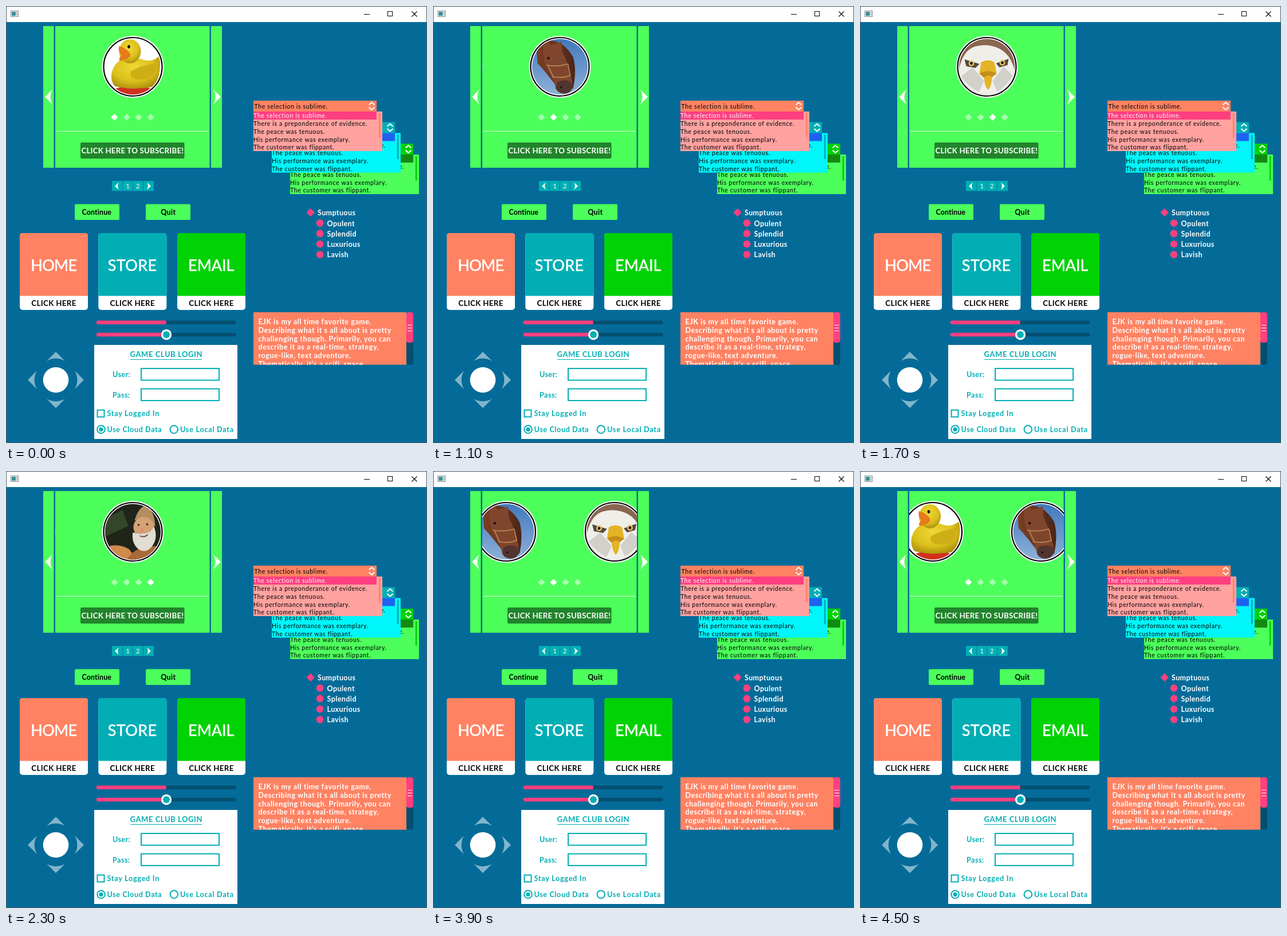
An HTML page for the animation above (4.6 s loop, 735 by 762 pixels).

```html
<!DOCTYPE html>
<html lang="en">
<head>
<meta charset="utf-8">
<title>Interface widgets</title>
<style>
html, body { margin: 0; width: 100%; height: 100%; overflow: hidden; background: #046b99; }
svg { display: block; font-family: Lato, "Open Sans", sans-serif; }
text { white-space: pre; }
</style>
</head>
<body>
<svg id="stage" width="735" height="762" viewBox="0 0 735 762">
  <defs>
    <clipPath id="panel"><rect x="86" y="35" width="270" height="247"/></clipPath>
    <clipPath id="lens"><circle r="48.5"/></clipPath>
    <clipPath id="story"><rect x="432" y="534" width="267" height="91.5"/></clipPath>
    <linearGradient id="sky" x1="0" y1="0" x2="0" y2="1">
      <stop offset="0" stop-color="#3f78bd"/><stop offset="1" stop-color="#8fb2d8"/>
    </linearGradient>
    <linearGradient id="coat">
      <stop offset="0" stop-color="#7c3f24"/><stop offset="1" stop-color="#4c2618"/>
    </linearGradient>
    <radialGradient id="yellow" cx=".45" cy=".35" r=".7">
      <stop offset="0" stop-color="#f0d834"/><stop offset=".6" stop-color="#dcc01c"/><stop offset="1" stop-color="#a88a0c"/>
    </radialGradient>

    <g id="pic0">
      <rect x="-50" y="-50" width="100" height="100" fill="#fff"/>
      <ellipse cx="1" cy="42" rx="35" ry="8" fill="#d2301f"/>
      <path d="M-20 -13C-41 0 -41 25 -31 34Q0 42 35 35C46 26 49 4 47 -20C38 -9 24 -9 13 -14Z" fill="url(#yellow)"/>
      <path d="M-4 9C10 -2 31 -3 42 -8C42 14 29 24 8 22Q-5 20 -4 9Z" fill="#cfae15"/>
      <ellipse cx="-5" cy="-27" rx="19" ry="21" fill="url(#yellow)"/>
      <path d="M-24 -36Q-13 -33 -6 -25Q-2 -19 -9 -15L-22 -10Q-27 -14 -19 -20Q-27 -27 -24 -36Z" fill="#e8791c"/>
      <ellipse cx="-7" cy="-35" rx="2.4" ry="3" fill="#20180c"/>
    </g>
    <g id="pic1">
      <rect x="-50" y="-50" width="100" height="100" fill="url(#sky)"/>
      <path d="M-41 -34Q-35 -48 -17 -46Q8 -44 23 -17Q30 6 23 38L3 46Q-25 8 -39 -6Z" fill="url(#coat)"/>
      <path d="M-29 -42L-25 -52L-16 -38L3 -44L4 -27Q15 -4 21 23Q25 41 13 46Q-2 49 -7 38Q-10 23 -20 8Q-32 -14 -29 -42Z" fill="#80462d"/>
      <path d="M-5 27Q9 20 20 27Q26 40 13 46Q-1 49 -7 38Z" fill="#523530"/>
      <path d="M-24 -3Q-7 1 14 -5M-14 17Q2 21 19 15M-21 -3L-12 17M14 -5L18 15" fill="none" stroke="#b98e55" stroke-width="1.5"/>
      <circle cx="-20" cy="-15" r="2.3" fill="#1d1210"/>
      <circle cx="2" cy="36" r="2" fill="#241614"/>
    </g>
    <g id="pic2">
      <rect x="-50" y="-50" width="100" height="100" fill="#8a6650"/>
      <path d="M-50 11Q-43 -31 -18 -36Q4 -41 23 -31Q43 -20 50 11V50H-50Z" fill="#efeee9"/>
      <path d="M-45 17Q-34 34 -14 44L-5 25L-25 1ZM45 15Q35 34 18 43L10 25L29 0Z" fill="#d2d0ca"/>
      <path d="M-39 -13L-13 -5L-20 2L-36 -1ZM38 -14L16 -6L22 1L36 -3Z" fill="#56483d"/>
      <circle cx="-27" cy="-6" r="5" fill="#e2c260"/><circle cx="27" cy="-7" r="5" fill="#e2c260"/>
      <circle cx="-27" cy="-6" r="2.4" fill="#161310"/><circle cx="27" cy="-7" r="2.4" fill="#161310"/>
      <path d="M-10 -8Q2 -15 13 -8L17 12L9 18Q8 36 2 40Q-4 34 -5 19L-13 12Z" fill="#e4b327"/>
      <path d="M-13 12Q1 3 17 12L9 18Q2 12 -5 19Z" fill="#c58e1b"/>
    </g>
    <g id="pic3">
      <rect x="-50" y="-50" width="100" height="100" fill="#20251a"/>
      <path d="M-50 -22L-18 -38L-8 -10L-50 9Z" fill="#344629"/>
      <path d="M-50 28Q-28 18 -7 30L9 50H-50Z" fill="#d08b4c"/>
      <path d="M-11 50Q2 24 42 25L50 50Z" fill="#a96938"/>
      <path d="M3 -20Q10 -44 24 -46Q39 -33 39 -9L28 -18Z" fill="#b48d61"/>
      <ellipse cx="19" cy="-8" rx="18" ry="18" fill="#d5a177"/>
      <path d="M0 1Q11 5 18 3Q30 4 37 -9Q45 12 32 27Q21 39 8 29Q-3 18 0 1Z" fill="#dfddd4"/>
      <circle cx="16" cy="-3" r="4.2" fill="#dd9670"/>
      <circle cx="10" cy="-12" r="1.8" fill="#33251c"/><circle cx="25" cy="-13" r="1.8" fill="#33251c"/>
      <path d="M12 7Q19 11 26 5" fill="none" stroke="#874b36" stroke-width="2"/>
    </g>
  </defs>
</svg>
<script>
const PINK = "#ff3f7f", CORAL = "#ff8262", TEAL = "#00aeb4", LIME = "#4cff5b",
      GREEN = "#00d204", DEEP = "#044f70", WHITE = "#fff", BLACK = "#000";
const out = [];
const add = s => out.push(s);
const rect = (x, y, w, h, fill, rx = 0, more = "") =>
  add(`<rect x="${x}" y="${y}" width="${w}" height="${h}" rx="${rx}" fill="${fill}" ${more}/>`);
const box = (x, y, w, h, stroke, width) =>
  rect(x, y, w, h, "none", 0, `stroke="${stroke}" stroke-width="${width}"`);
const circle = (x, y, r, fill, more = "") =>
  add(`<circle cx="${x}" cy="${y}" r="${r}" fill="${fill}" ${more}/>`);
const path = (d, fill, more = "") => add(`<path d="${d}" fill="${fill}" ${more}/>`);
const line = (d, stroke, width) => path(d, "none", `stroke="${stroke}" stroke-width="${width}"`);
const text = (s, x, y, size, fill, weight = 700, gap = 0, more = "") =>
  add(`<text x="${x}" y="${y}" font-size="${size}" fill="${fill}" font-weight="${weight}" letter-spacing="${gap}" ${more}>${s}</text>`);
const MID = 'text-anchor="middle"';
const diamond = (x, y, r) => `M${x - r} ${y}L${x} ${y - r}L${x + r} ${y}L${x} ${y + r}Z`;

function star(x, y, r) {
  let d = "";
  for (let i = 0; i < 16; i++) {
    const a = i * Math.PI / 8, q = i % 2 ? r * 0.78 : r;
    d += `${i ? "L" : "M"}${(x + q * Math.cos(a)).toFixed(2)} ${(y + q * Math.sin(a)).toFixed(2)}`;
  }
  return d + "Z";
}

// Arrowhead with a hollow back, pointing left before rotation.
const arrow = (x, y, len, half, turn, more = "") =>
  path(`M0 0L${len} ${-half}Q${len * 0.45} 0 ${len} ${half}Z`, WHITE,
    `transform="translate(${x} ${y}) rotate(${turn})" ${more}`);

function titleBar() {
  rect(0, 0, 735, 28, WHITE);
  rect(8.5, 8.5, 13, 10, "#f4f6f7", 0, 'stroke="#7f898e"');
  rect(10, 10, 7, 7, "#3b8f98");
  rect(18, 10, 2, 7, "#a9bcc2");
  line("M625 14.5H635", BLACK, 1);
  box(666.5, 9.5, 8, 8, BLACK, 1);
  line("M708.5 9.5L717.5 18.5M717.5 9.5L708.5 18.5", BLACK, 1.1);
}

function carousel() {
  rect(65, 35, 18.5, 247, LIME);
  rect(86, 35, 269.5, 247, LIME);
  rect(358, 35, 19, 247, LIME);
  arrow(68, 158.5, 13, 13, 0);
  arrow(375, 158.5, 13, 13, 180);
  add('<g clip-path="url(#panel)"><g id="strip">');
  for (let i = 0; i < 4; i++) {
    add(`<g transform="translate(${221.5 + i * STEP} 106)">`);
    circle(0, 0, 54, WHITE);
    circle(0, 0, 51, WHITE, 'stroke="#000" stroke-width="2.2"');
    add(`<g clip-path="url(#lens)"><use href="#pic${i}"/></g></g>`);
  }
  add("</g></g>");
  for (let i = 0; i < 4; i++) path(diamond(189.3 + i * 21.1, 194, 6), WHITE, 'class="dot"');
  line("M88 218.5H354", "#d2ffd5", 1);
  rect(130, 238, 181.5, 28, "#21842b", 2);
  text("CLICK HERE TO SUBSCRIBE!", 220.8, 257, 13.3, WHITE, 700, 0.2, MID);
}

function pager() {
  rect(185, 305, 73, 17.5, TEAL);
  line("M203.5 305V322.5M221.5 305V322.5M239.5 305V322.5", "#04809f", 1);
  arrow(190, 314, 7, 6.5, 0);
  arrow(253, 314, 7, 6.5, 180);
  text("1", 212.6, 318, 11, WHITE, 400, 0, MID);
  text("2", 230.2, 318, 11, WHITE, 400, 0, MID);
}

function tile(x, label, fill, gap) {
  rect(x, 396, 119, 134, WHITE, 5);
  path(`M${x} 505.5V401q0 -5 5 -5h109q5 0 5 5V505.5Z`, fill);
  text(label, x + 59.3, 461.5, 27, WHITE, 400, gap, MID + ' stroke="#fff" stroke-width=".5"');
  text("CLICK HERE", x + 59.5, 522.5, 13.3, BLACK, 700, 0.35, MID);
}

function buttons() {
  rect(120, 345.5, 78, 27.5, LIME, 2);
  rect(244, 345.5, 78, 27.5, LIME, 2);
  text("Continue", 158.3, 364, 12.5, BLACK, 700, 0.1, MID);
  text("Quit", 283.3, 364, 12.5, BLACK, 700, 0.3, MID);
  tile(24, "HOME", CORAL, -0.7);
  tile(161.3, "STORE", TEAL, 0.4);
  tile(299, "EMAIL", GREEN, 0);
}

function sliders() {
  for (const y of [548.5, 569.7]) {
    rect(158, y, 243.5, 6.5, DEEP, 3);
    path(`M279.5 ${y}H161a3.2 3.25 0 0 0 0 6.5H279.5Z`, PINK);
  }
  circle(280, 573, 9.2, WHITE);
  path(star(280, 573, 6.8), TEAL);
}

function stick() {
  circle(87, 652, 22.3, WHITE);
  [[38, 652], [87, 603], [136, 652], [87, 701]].forEach(([x, y], i) =>
    arrow(x, y, 16, 16, i * 90, 'opacity=".5"'));
}

function login() {
  rect(154, 591, 250, 164, WHITE);
  text("GAME CLUB LOGIN", 279.8, 612, 13, TEAL, 700, 0.57, MID);
  line("M217 616.5H342", TEAL, 1);
  text("User:", 186, 647, 12.6, TEAL, 700, 0.35);
  text("Pass:", 186, 682.5, 12.6, TEAL, 700, 0.45);
  box(236, 632, 136, 20.5, TEAL, 2);
  box(236, 667.5, 136, 20.5, TEAL, 2);
  box(159.5, 704.5, 12, 12, TEAL, 2);
  text("Stay Logged In", 176.5, 715, 12.6, TEAL, 700, 0.74);
  for (const x of [166, 293.3]) circle(x, 738.3, 6.8, WHITE, `stroke="${TEAL}" stroke-width="2"`);
  circle(166, 738.3, 3.6, TEAL);
  text("Use Cloud Data", 176.5, 743, 12.6, TEAL, 700, 0.62);
  text("Use Local Data", 304, 743, 12.6, TEAL, 700, 0.76);
}

const ROWS = ["The selection is sublime.", "There is a preponderance of evidence.",
  "The peace was tenuous.", "His performance was exemplary.", "The customer was flippant."];

function dropdown(x, y, head, pick, list) {
  const row = (s, dx, dy, fill = BLACK) => text(s, x + dx, y + dy, 10.5, fill, 400, 0.66);
  rect(x, y, 215, 19, head);
  row(ROWS[0], 1.5, 14);
  line(`M${x + 201.5} ${y + 7.5}l5 -4.5l5 4.5m-10 4l5 4.5l5 -4.5`, WHITE, 2);
  rect(x, y + 19, 225, 69, list);
  rect(x, y + 19, 215, 14, pick);
  ROWS.forEach((s, i) => row(s, 0, 30.3 + i * 13.75, i ? BLACK : WHITE));
  rect(x + 218.8, y + 22, 2.8, 42.5, head);
}

function bullets() {
  path(diamond(531.7, 360, 7.2), PINK);
  text("Sumptuous", 544, 365, 12.5, WHITE, 700, 0.4);
  ["Opulent", "Splendid", "Luxurious", "Lavish"].forEach((s, i) => {
    path(star(548, 378.5 + i * 18.3, 7.2), PINK);
    text(s, 560.5, 383.5 + i * 18.3, 12.5, WHITE, 700, 0.42);
  });
}

function story() {
  rect(432, 534, 267, 91.5, CORAL);
  add('<g clip-path="url(#story)">');
  ["EJK is my all time favorite game.", "Describing what it s all about is pretty",
    "challenging though. Primarily, you can", "describe it as a real-time, strategy,",
    "rogue-like, text adventure.", "Thematically, it's a scifi, space"
  ].forEach((s, i) => text(s, 440.5, 555.3 + i * 14.7, 12.5, WHITE, 700, 0.58));
  add("</g>");
  rect(699, 534, 12, 91.5, DEEP, 4);
  rect(699, 534, 12, 53, PINK, 4);
  line("M701 556.5H709M701 561.5H709M701 566.5H709", WHITE, 1);
}

const STEP = 189, LOOP = 4600;
rect(0, 0, 735, 762, "#046b99");
titleBar();
carousel();
pager();
buttons();
sliders();
stick();
login();
dropdown(496, 240, GREEN, "#118a12", LIME);
dropdown(464, 202.5, TEAL, "#1e62f0", "#00f6fa");
dropdown(432, 165, CORAL, PINK, "#ffa2a0");
bullets();
story();
box(0.5, 0.5, 734, 761, "#4d5960", 1);
document.getElementById("stage").insertAdjacentHTML("beforeend", out.join(""));

const strip = document.getElementById("strip");
const dots = [...document.querySelectorAll(".dot")];

// Start time, scroll position in slides, lit dot.
const STOPS = [[0, 0, 0], [1000, 0.5, 0], [1100, 1, 1], [1600, 1.495, 1],
  [1700, 2, 2], [2200, 2.5, 2], [2300, 3, 3], [3300, 2.505, 2],
  [3400, 2, 2], [3900, 1.495, 1], [4000, 1, 1], [4500, 0.5, 0]];

function draw(ms) {
  const t = ms % LOOP;
  const [, pos, lit] = STOPS.filter(s => s[0] <= t).pop();
  strip.setAttribute("transform", `translate(${-pos * STEP} 0)`);
  dots.forEach((d, i) => d.setAttribute("opacity", i === lit ? 1 : 0.5));
}

let start = null;
function tick(now) {
  if (start === null) start = now;
  draw(Math.max(0, now - start));
  requestAnimationFrame(tick);
}
draw(0);
requestAnimationFrame(tick);
</script>
</body>
</html>
```
